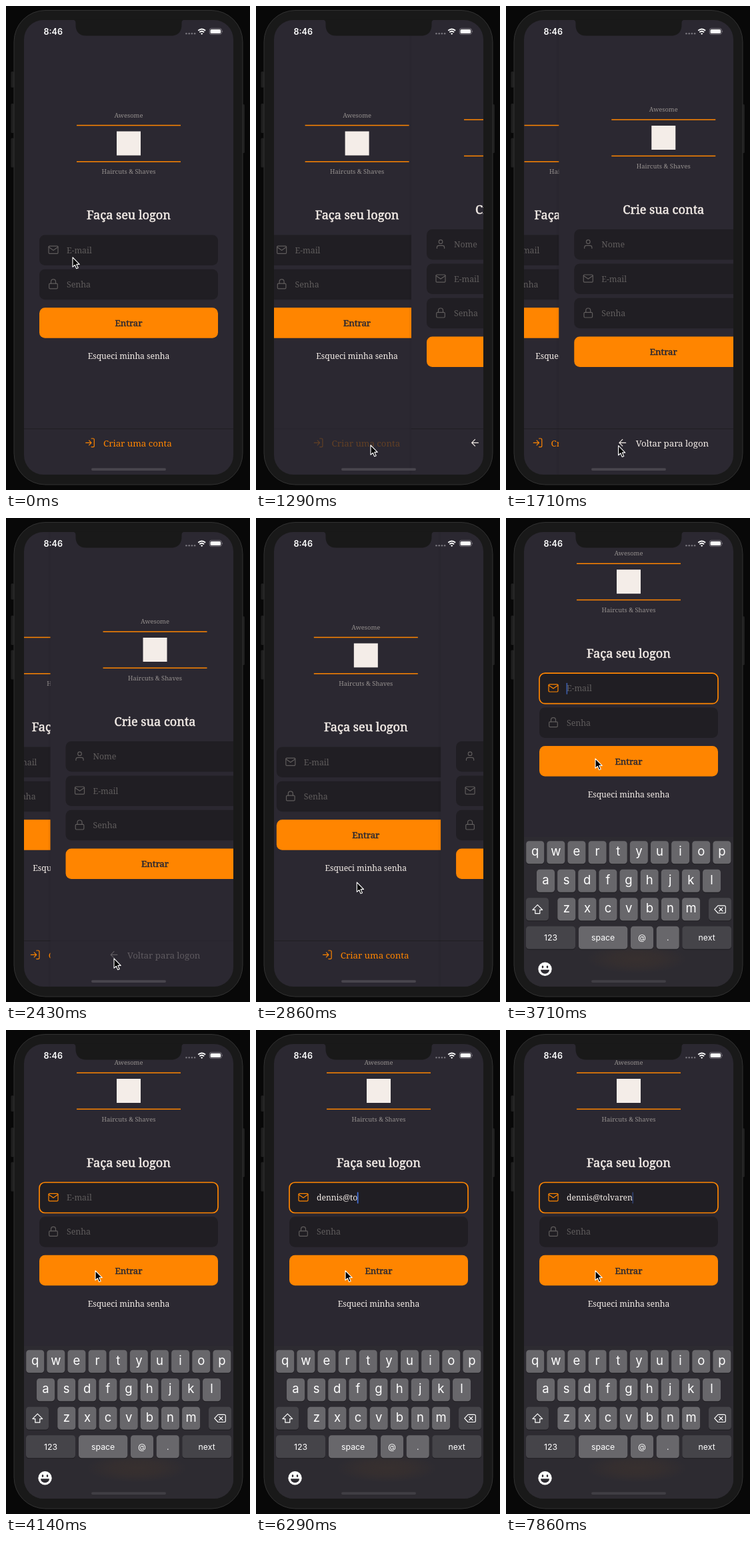
An HTML page for the animation above (8 s loop, 366 by 724 pixels).

```html
<!DOCTYPE html>
<html lang="pt-BR">
<head>
<meta charset="utf-8">
<title>Logon</title>
<style>
  html, body { margin: 0; width: 100%; height: 100%; overflow: hidden; background: #080808; }
  svg { display: block; width: 100vw; height: 100vh; }
  text { font-family: "Noto Serif", serif; fill: #f4ede8; }
  .mid { text-anchor: middle; }
  .tag { font-size: 9.4px; fill: #96918f; }
  .title { font-size: 18.2px; letter-spacing: -.05px; stroke: #f4ede8; stroke-width: .5px; }
  .hint { font-size: 12.4px; letter-spacing: -.05px; fill: #5f5c5c; }
  .link, .typed { font-size: 12.2px; letter-spacing: -.04px; }
  .go { font-size: 13.3px; letter-spacing: -.05px; fill: #2b2831; stroke: #2b2831; stroke-width: .5px; }
  .foot { font-size: 13.4px; letter-spacing: -.06px; }
  .icon { fill: none; stroke: #5f5c5c; stroke-width: 1.7; stroke-linecap: round; stroke-linejoin: round; }
  .hot { stroke: #ff8500; }
  .sans { font-family: Inter, sans-serif; fill: #fff; text-anchor: middle; }
  .clock { font-size: 12.6px; font-weight: 600; }
  .letter { font-size: 18.5px; }
  .label { font-size: 12.3px; }
</style>
</head>
<body>
<svg id="stage" viewBox="0 0 366 724"></svg>
<script>
const ORANGE = '#ff8500', BG = '#2b2831', FIELD = '#201e23';
const LEFT = 27, WIDTH = 314, LOOP = 8000, RATE = 7;

const icons = {
  mail: '<rect x="2" y="4" width="20" height="16" rx="2"/><path d="M22 6 12 13 2 6"/>',
  lock: '<rect x="3" y="11" width="18" height="11" rx="2"/><path d="M7 11V7a5 5 0 0 1 10 0v4"/>',
  user: '<path d="M20 21v-2a4 4 0 0 0-4-4H8a4 4 0 0 0-4 4v2"/><circle cx="12" cy="7" r="4"/>',
  enter: '<path d="M15 3h4a2 2 0 0 1 2 2v14a2 2 0 0 1-2 2h-4M10 17l5-5-5-5M15 12H3"/>',
  back: '<path d="M19 12H5M12 19l-7-7 7-7"/>'
};

const rect = (x, y, w, h, fill, r = 0, more = '') =>
  `<rect x="${x}" y="${y}" width="${w}" height="${h}" rx="${r}" fill="${fill}" ${more}/>`;
const text = (x, y, cls, str, more = '') => `<text x="${x}" y="${y}" class="${cls}" ${more}>${str}</text>`;
const icon = (name, cx, cy, more = '') =>
  `<g class="icon" transform="translate(${cx - 8.4} ${cy - 8.4}) scale(.7)" ${more}>${icons[name]}</g>`;

const brand = y =>
  text(184, y - 39, 'tag mid', 'Awesome') +
  rect(106, y - 27.7, 156, 1.5, ORANGE) +
  rect(166, y - 18, 36, 36, '#f4ede8') +
  rect(106, y + 26.6, 156, 1.5, ORANGE) +
  text(184, y + 45.6, 'tag mid', 'Haircuts &amp; Shaves');

const field = (y, name, hint, id = '') =>
  rect(50, y, 268, 45.5, FIELD, 8.4, `id="${id}Box"`) +
  icon(name, 71, y + 22.2, `id="${id}Icon"`) +
  text(91, y + 27.2, 'hint', hint, `id="${id}Hint"`);

const button = y => rect(50, y, 268, 45.5, ORANGE, 8.4) + text(184, y + 27.8, 'go mid', 'Entrar');

const footer = (id, name, iconX, textX, label, color) =>
  `<g id="${id}">${rect(LEFT, 632, WIDTH, 1, FIELD)}` +
  icon(name, iconX, 653.3, `style="stroke:${color}"`) +
  text(textX, 659, 'foot', label, `style="fill:${color}"`) + '</g>';

const login = `<g id="login">${rect(LEFT, 21, WIDTH, 680, BG)}
  ${footer('signLink', 'enter', 126, 146, 'Criar uma conta', ORANGE)}
  <g id="form">${brand(205.5)}
    ${text(184, 319.3, 'title mid', 'Faça seu logon')}
    ${field(342.5, 'mail', 'E-mail', 'mail')}
    ${text(91, 369.7, 'typed', '', 'id="typed"')}
    ${rect(90.5, 357, 1.7, 17, '#4673dc', .6, 'id="caret"')}
    ${field(393.7, 'lock', 'Senha', 'pass')}
    ${button(451.3)}
    ${text(184, 528.2, 'link mid', 'Esqueci minha senha')}
  </g></g>`;

const signup = `<g id="signup">
  ${rect(LEFT - 3, 21, 3, 680, '#000', 0, 'opacity=".04"')}
  ${rect(LEFT, 21, WIDTH, 680, BG)}
  ${brand(197)}
  ${text(184, 310.5, 'title mid', 'Crie sua conta')}
  ${field(334, 'user', 'Nome', 'newName')}
  ${field(385.4, 'mail', 'E-mail', 'newMail')}
  ${field(436.8, 'lock', 'Senha', 'newPass')}
  ${button(494.5)}
  ${footer('backLink', 'back', 122.5, 142.5, 'Voltar para logon', '#f4ede8')}</g>`;

const key = (x, y, w, label, cls = 'label', dark = false) =>
  rect(x, y + 1, w, 34, '#1d1c20', 4.4) + rect(x, y, w, 34, dark ? '#454449' : '#68676b', 4.4) +
  text(x + w / 2, y + (cls === 'letter' ? 21.8 : 21.3), 'sans ' + cls, label);
const keyRow = (letters, x, y) => [...letters].map((c, i) => key(x + i * 31.13, y, 27, c, 'letter')).join('');

const keyboard = `<g id="keyboard">
  ${rect(LEFT, 472.5, WIDTH, 230, '#2d2b31')}
  <ellipse cx="196" cy="655" rx="76" ry="22" fill="url(#glow)"/>
  ${keyRow('qwertyuiop', 30.2, 478.7)}
  ${keyRow('asdfghjkl', 46, 521.2)}
  ${keyRow('zxcvbnm', 77.3, 563.7)}
  ${key(30, 563.7, 34, '', 'label', true)}
  ${key(304, 563.7, 34, '', 'label', true)}
  <g fill="none" stroke="#fff" stroke-width="1.2" stroke-linejoin="round" stroke-linecap="round">
    <path d="M47.3 574.2l7.4 7.4h-3.9v5.6h-7v-5.6h-3.9z"/>
    <path d="M318 575.3h9.5a1.8 1.8 0 0 1 1.8 1.8v7.6a1.8 1.8 0 0 1-1.8 1.8H318l-5.2-5.6zM319.8 578.3l5.2 5.2m0-5.2-5.2 5.2"/>
  </g>
  ${key(30, 606.2, 74, '123', 'label', true)}
  ${key(109, 606.2, 73.3, 'space')}
  ${key(187, 606.2, 34, '@', 'label')}
  ${key(225.7, 606.2, 34, '.')}
  ${key(264.3, 606.2, 73.7, 'next', 'label', true)}
  <circle cx="58.5" cy="670.3" r="10.2" fill="#fff"/>
  <g fill="#2d2b31"><ellipse cx="55" cy="667" rx="1.3" ry="1.9"/><ellipse cx="62" cy="667" rx="1.3" ry="1.9"/>
  <path d="M52 671.3h13a6.5 6 0 0 1-13 0z"/></g></g>`;

const sideButton = (x, y, h) => rect(x, y, 4.5, h, '#1f1f1f', 1.5);
const phone = sideButton(7.5, 98, 24) + sideButton(7.5, 146, 44) + sideButton(7.5, 197.5, 44) +
  sideButton(353.5, 147, 73) + rect(12, 6.5, 343, 709.5, '#191919', 47, 'stroke="#323232"');

const status = `
  <path d="M99 20.5h170c-4 0-5.5 2-5.5 5v3c0 10-6 16-15.5 16H120c-10 0-15.5-6-15.5-16v-3c0-3-1.5-5-5.5-5z" fill="#191919"/>
  ${text(70.7, 42.8, 'sans clock', '8:46')}
  ${[0, 1, 2, 3].map(i => `<circle cx="${270.5 + i * 4.2}" cy="41.3" r="1.3" fill="#77747c"/>`).join('')}
  <g fill="none" stroke="#fff" stroke-width="1.9"><path d="M288.3 36.7q5.4-4.6 10.8 0M290.3 39.2q3.4-2.9 6.8 0"/></g>
  <path d="M291.9 41.1q1.8-1.4 3.6 0l-1.8 1.9z" fill="#fff"/>
  ${rect(305.3, 33.6, 18, 8.8, 'none', 2.6, 'stroke="#8d8a92" stroke-width=".8"')}
  ${rect(306.6, 34.9, 15.4, 6.2, '#fff', 1.5)}
  <path d="M324.4 36.5q1.5 1.5 0 3z" fill="#8d8a92"/>`;

document.getElementById('stage').innerHTML = `
  <defs>
    <clipPath id="glass"><rect x="${LEFT}" y="21" width="${WIDTH}" height="680" rx="29"/></clipPath>
    <radialGradient id="glow"><stop offset="0" stop-color="${ORANGE}" stop-opacity=".05"/>
    <stop offset=".5" stop-color="${ORANGE}" stop-opacity=".035"/>
    <stop offset="1" stop-color="${ORANGE}" stop-opacity="0"/></radialGradient>
  </defs>
  ${phone}
  <g clip-path="url(#glass)">${login}${signup}${keyboard}
    ${rect(128, 691.2, 112, 3.7, '#48454d', 1.85, 'id="homeBar"')}</g>
  ${status}
  <path id="cursor" d="M0 0V14.3L3.3 11.3 5.7 16.8 8.2 15.7 5.8 10.4H10.2Z" fill="#000" stroke="#fff" stroke-width="1.1" stroke-linejoin="round"/>`;

const $ = id => document.getElementById(id);
const clamp = v => Math.max(0, Math.min(1, v));
const move = (id, x, y) => $(id).setAttribute('transform', `translate(${x.toFixed(2)} ${y.toFixed(2)})`);
const smooth = u => u * u * (3 - 2 * u);

// Screen stack: 0 is the login, 1 the sign-up form
function slide(t) {
  if (t < 1.154) return 0;
  if (t < 2.389) return 1 - Math.exp(-3.2 * (t - 1.154));
  const p = Math.exp(-3.4 * (t - 2.389));
  return p < .027 ? 0 : p;
}

// A pressed link dims at once and fades back after release
const press = (t, down, up) => t < down ? 1 : .25 + .75 * clamp((t - up) / .25);

const stops = [[0.1, 1.05, 100, 376, 172, 657], [1.4, 2.2, 172, 657, 162, 659], [2.5, 3.35, 162, 659, 134, 360]];
function pointer(t) {
  const [a, b, x0, y0, x1, y1] = stops.filter(s => t >= s[0]).pop() || stops[0];
  const u = smooth(clamp((t - a) / (b - a)));
  return [x0 + (x1 - x0) * u, y0 + (y1 - y0) * u];
}

const ADDRESS = 'dennis@tolvaren', FOCUS = 3.44;
const strokes = [...ADDRESS].map((c, i) => i < 9 ? 5 + i * .157 : 6.57 + (i - 9) * .142);

function caretAlpha(t, since) {
  const s = (t - since) % 1.2;
  return s > .95 ? (s - .95) / .25 : 1 - clamp((s - .25) / .55);
}

function render(t) {
  const p = slide(t);
  move('login', -.3 * WIDTH * p, 0);
  move('signup', WIDTH * (1 - p), 0);
  $('signup').style.display = p ? '' : 'none';
  $('signLink').style.opacity = press(t, 1.1, 1.3);
  $('backLink').style.opacity = press(t, 2.25, 2.45);

  const rest = 1 - clamp((t - 3.435) / .34);
  const rise = 1 - rest ** 2.28;
  move('form', 0, -114.5 * (1 - rest ** 1.92));
  move('keyboard', 0, 228.5 * (1 - rise));
  $('homeBar').style.fill = rise > 0 && rise < .9 ? '#161518' : rise ? '#403e44' : '#48454d';

  const focused = t >= FOCUS;
  $('mailBox').setAttribute('stroke', focused ? ORANGE : 'none');
  $('mailBox').setAttribute('stroke-width', 1.7);
  $('mailIcon').classList.toggle('hot', focused);

  const done = strokes.filter(s => s <= t + .004);
  $('typed').textContent = ADDRESS.slice(0, done.length);
  $('mailHint').style.opacity = done.length ? 0 : 1;
  $('caret').setAttribute('x', 90.5 + (done.length ? $('typed').getComputedTextLength() : 0));
  $('caret').style.opacity = focused ? caretAlpha(t, done.length ? done[done.length - 1] : 3.3) : 0;

  move('cursor', ...pointer(t));
}

function tick(now) {
  const ms = now % LOOP;
  render(Math.floor((ms + 4) * RATE / 1000) / RATE);
  requestAnimationFrame(tick);
}
render(0);
requestAnimationFrame(tick);
</script>
</body>
</html>
```
